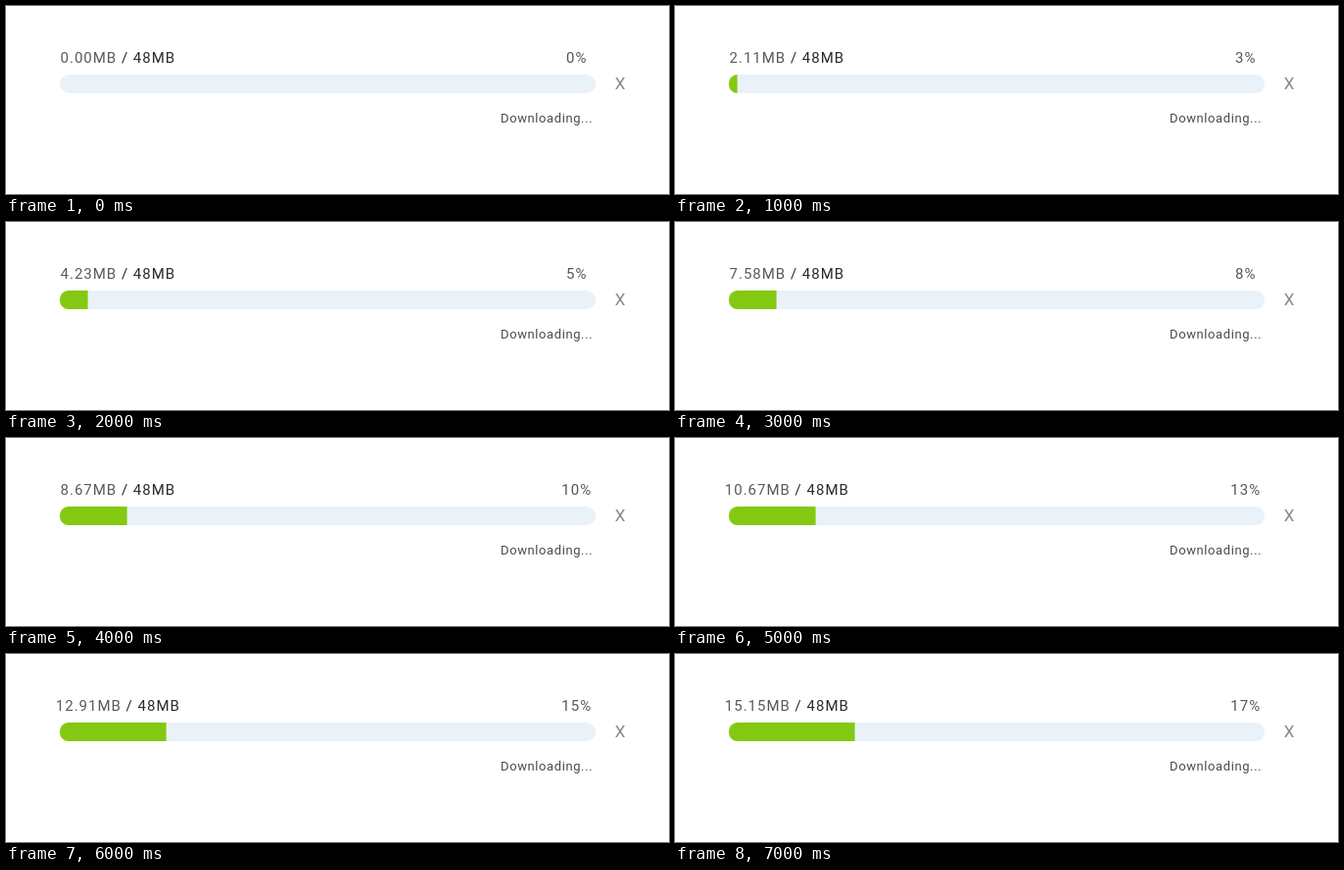
Write an HTML page with a canvas that moves like this. It is 677 px wide and 192 px high and loops after 8000 ms.

```html
<!DOCTYPE html>
<html lang="en">
<head>
<meta charset="utf-8">
<title>Download progress</title>
<style>
html, body { margin: 0; width: 100%; height: 100%; overflow: hidden; background: #fff; }
canvas { display: block; }
</style>
</head>
<body>
<canvas id="stage" width="677" height="192"></canvas>
<script>
const ctx = document.getElementById('stage').getContext('2d');
const STEP = 1000;
const TOTAL = '48MB';
const BAR = { x: 55, y: 70, w: 547, h: 19 };

// One reading per second: megabytes loaded and percent shown.
const readings = [
  [0, 0], [2.11, 3], [4.23, 5], [7.58, 8],
  [8.67, 10], [10.67, 13], [12.91, 15], [15.15, 17]
];

function setFont(size, spacing, weight = 400) {
  ctx.font = `${weight} ${size}px Roboto, sans-serif`;
  ctx.letterSpacing = `${spacing}px`;
}

function write(text, x, y, color) {
  ctx.fillStyle = color;
  ctx.fillText(text, x, y);
}

function writeCentered(parts, center, y) {
  const widths = parts.map(([text]) => ctx.measureText(text).width);
  let x = center - widths.reduce((sum, w) => sum + w, 0) / 2;
  parts.forEach(([text, color], i) => {
    write(text, x, y, color);
    x += widths[i];
  });
}

function drawBar(step) {
  const { x, y, w, h } = BAR;
  ctx.beginPath();
  ctx.roundRect(x, y, w, h, h / 2);
  ctx.fillStyle = '#eaf1f7';
  ctx.fill();
  if (step === 0) return;
  ctx.save();
  ctx.beginPath();
  ctx.roundRect(x, y, w, h, 8.8);
  ctx.clip();
  ctx.fillStyle = '#84c911';
  ctx.fillRect(x, y, 8.6 + 20 * (step - 1), h);
  ctx.restore();
}

function draw(time) {
  const step = Math.floor(time / STEP) % readings.length;
  const [loaded, percent] = readings[step];
  ctx.fillStyle = '#fff';
  ctx.fillRect(0, 0, 677, 192);
  drawBar(step);

  setFont(15, 1);
  writeCentered([[`${loaded.toFixed(2)}MB`, '#5a5a5a'], [` / ${TOTAL}`, '#2b2b2b']], 114.3, 58);
  writeCentered([[`${percent}%`, '#555']], 582.7, 58);
  setFont(13, 0.6);
  write('Downloading...', 505, 119, '#4a4a4a');
  setFont(17, 0);
  writeCentered([['X', '#888']], 627.2, 85);
}

function tick() {
  draw(performance.now());
  requestAnimationFrame(tick);
}
tick();
</script>
</body>
</html>
```
